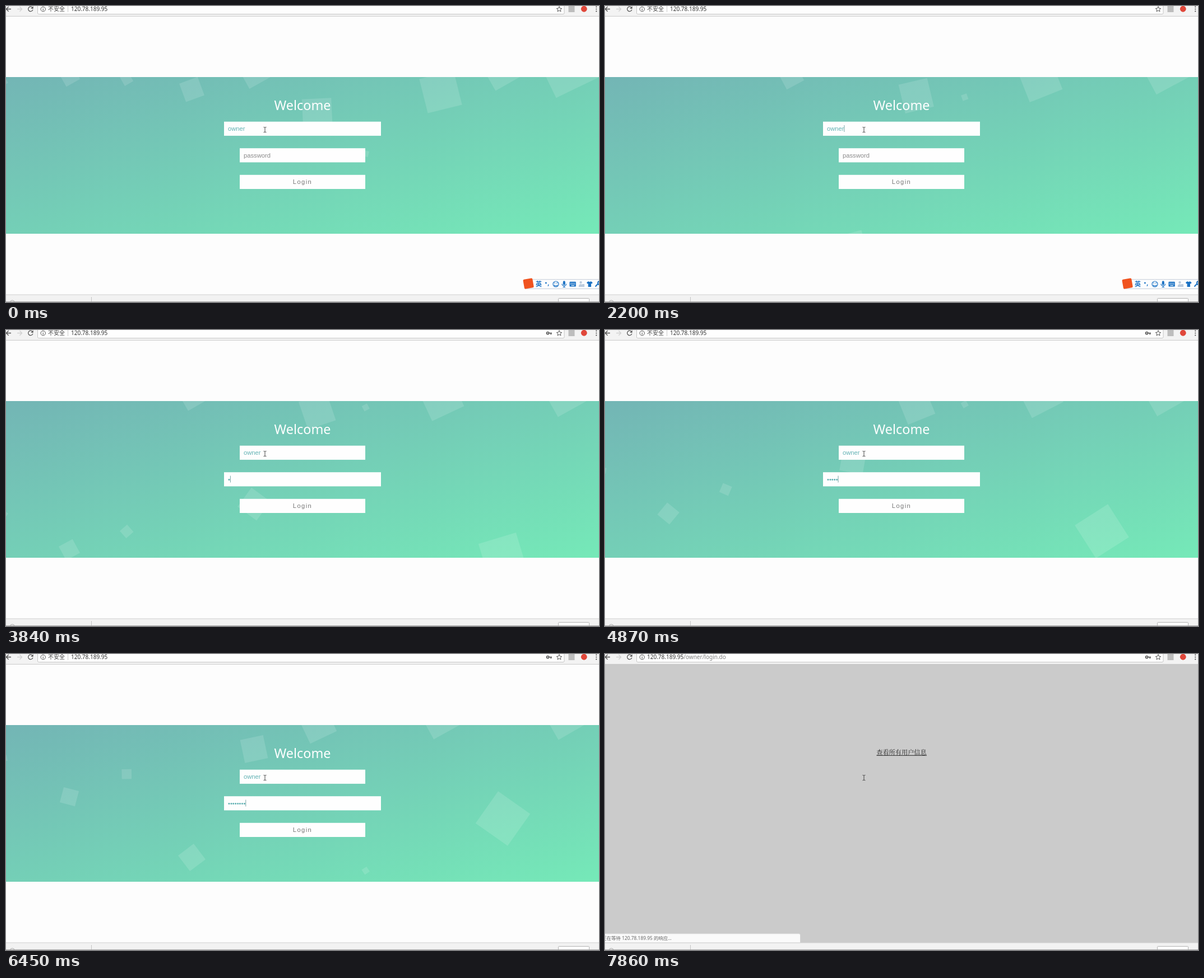
An HTML page for the animation above (8000 ms loop, 1058 px wide and 529 px high).

```html
<!DOCTYPE html>
<html lang="zh-CN">
<head>
<meta charset="utf-8">
<title>Login</title>
<style>
  html, body { margin: 0; width: 100%; height: 100%; overflow: hidden; background: #fdfdfd; }
  svg { display: block; width: 100%; height: 100%; }
  text { white-space: pre; }
  .ui { font-family: "Noto Sans", "Noto Sans CJK SC", sans-serif; font-size: 10px; fill: #333; }
  .field { font-family: "Liberation Sans", Arial, sans-serif; font-size: 11.2px; }
  .line { fill: none; stroke: #555; stroke-width: 1.3; }
  .blue { fill: #1b72c4; }
</style>
</head>
<body>
<svg viewBox="0 0 1058 529">
  <defs>
    <linearGradient id="sea" x1="0" y1="0" x2="1" y2="1">
      <stop offset="0" stop-color="#73b5b5"/>
      <stop offset="1" stop-color="#75e9b8"/>
    </linearGradient>
    <clipPath id="band"><rect y="127" width="1058" height="280"/></clipPath>
  </defs>

  <rect width="1058" height="529" fill="#fdfdfd"/>

  <g id="login">
    <rect x="-8.5" y="127" width="1075" height="280" fill="url(#sea)"/>
    <g id="bubbles" clip-path="url(#band)" fill="#fff" fill-opacity=".13"></g>
    <text x="529" y="186" text-anchor="middle" fill="#fff" class="ui" style="font-size:23.4px;fill:#fff">Welcome</text>
    <rect id="userBox" y="206.7" height="25.2" fill="#fefefe"/>
    <text id="userText" class="field" y="223"></text>
    <rect id="passBox" y="254.2" height="25.2" fill="#fefefe"/>
    <text id="passText" class="field" y="270.5"></text>
    <rect id="caret" width=".9" height="12" fill="#6a9c9c"/>
    <rect x="417" y="301.8" width="224" height="25.2" fill="#fefefe"/>
    <text class="field" x="511.8" y="318" letter-spacing="1.4" fill="#777">Login</text>
  </g>

  <g id="result">
    <rect y="18" width="1058" height="498" fill="#cbcbcb"/>
    <text x="529" y="180" text-anchor="middle" fill="#222" font-size="11.2" font-weight="300" font-family="'Noto Serif CJK SC', 'Noto Sans CJK SC', serif">查看所有用户信息</text>
    <path d="M484.5 181.2h89.5" stroke="#222" stroke-width="1.1"/>
  </g>

  <g id="chrome">
    <rect width="1058" height="18" fill="#f3f3f3"/>
    <path d="M0 18.3H1058" stroke="#c9c9c9"/>
    <path d="M56.5 -1V12.5Q56.5 14.5 58.5 14.5H994Q996 14.5 996 12.5V-1" fill="#fefefe" stroke="#c4c4c4"/>
    <path class="line" d="M9 5.5H0.8M4.6 1.2 0.5 5.5 4.6 9.8"/>
    <path class="line" d="M20 5.5H28.2M24.4 1.2 28.5 5.5 24.4 9.8" style="stroke:#d2d2d2"/>
    <g id="reload">
      <path class="line" d="M47 2.6A4.2 4.2 0 1 0 47.9 6.6"/>
      <path d="M48.6 .4V4.8H44.2Z" fill="#555"/>
    </g>
    <path id="stop" class="line" d="M39.8 1.6 47.6 9.6M47.6 1.6 39.8 9.6" style="stroke-width:1.5"/>
    <circle class="line" cx="66.2" cy="5.6" r="4.2" style="stroke-width:1"/>
    <path d="M66.2 5V8.2M66.2 2.9V4" stroke="#555" stroke-width="1.1"/>
    <g id="insecure">
      <text class="ui" x="75" y="9.3" style="fill:#444">不安全</text>
      <path d="M110.5 0V11" stroke="#ccc"/>
    </g>
    <text class="ui" id="url" y="9.2">120.78.189.95<tspan id="path" fill="#808080">/owner/login.do</tspan></text>
    <g id="key">
      <circle class="line" cx="966.6" cy="5.5" r="2" style="stroke-width:1.7"/>
      <path d="M968.6 5.5H974M972.3 5.5V8.2" stroke="#555" stroke-width="1.7"/>
    </g>
    <path class="line" d="M987 .8 988.4 4.1 991.7 4.4 989.2 6.6 990 9.9 987 8.1 984 9.9 984.8 6.6 982.3 4.4 985.6 4.1Z" style="stroke-width:1"/>
    <rect x="1003.5" y="0" width="11" height="11" fill="#bdbdbd"/>
    <circle cx="1031.3" cy="5.3" r="5.4" fill="#e0473a"/>
    <g fill="#555"><circle cx="1053.3" cy="1.6" r="1.1"/><circle cx="1053.3" cy="5.5" r="1.1"/><circle cx="1053.3" cy="9.4" r="1.1"/></g>
  </g>

  <g id="ime">
    <rect x="926" y="488.8" width="140" height="16.4" rx="2" fill="#fcfdfe" stroke="#c3cbd8"/>
    <rect x="923.6" y="487.6" width="17" height="17" rx="2" fill="#f0531f" transform="rotate(-10 932 496)"/>
    <text class="ui blue" x="945" y="501" style="font-size:11px;font-weight:700;fill:#1b72c4">英</text>
    <circle class="blue" cx="963.4" cy="495" r="1.4"/>
    <path d="M967.6 497.5Q968.5 499.2 966.8 500.6" stroke="#1b72c4" stroke-width="1.4" fill="none"/>
    <g fill="none" stroke="#1b72c4" stroke-width="1.2">
      <circle cx="981" cy="497" r="5"/>
      <path d="M978 498.5Q981 502 984 498.5M979.2 494.2V496M982.8 494.2V496"/>
      <path d="M992 496.5Q992 500 995.8 500T999.6 496.5M995.8 500V502.5M993.5 502.5H998"/>
    </g>
    <rect class="blue" x="993.8" y="491.3" width="4" height="7.4" rx="2"/>
    <rect class="blue" x="1005.5" y="492.8" width="11.3" height="8.6" rx="1"/>
    <path d="M1007 495.3H1015.5M1007 497.3H1015.5" stroke="#fff" stroke-dasharray="1.3 1"/>
    <path d="M1008.5 499.6H1014" stroke="#fff"/>
    <g fill="#bccbdd"><circle cx="1025.5" cy="494" r="2.2"/><path d="M1021.8 502Q1021.8 497 1025.5 497T1029 502Z"/><rect x="1028" y="497" width="4" height="5"/></g>
    <path class="blue" d="M1039 492 1036 494.3 1037.3 496.6 1038.6 496V502H1044V496L1045.3 496.6 1046.6 494.3 1043.6 492Q1041.3 494 1039 492Z"/>
    <path d="M1051.5 501.5 1056 496.5M1059 492A3 3 0 1 0 1059 498" fill="none" stroke="#1b72c4" stroke-width="2"/>
  </g>

  <rect y="516" width="1058" height="13" fill="#f2f2f2"/>
  <path d="M0 516H1058" stroke="#cfcfcf"/>
  <path d="M152.5 520V528" stroke="#c4c4c4"/>
  <path d="M7 529A4.5 4.5 0 0 1 15.5 529" fill="none" stroke="#aaa"/>
  <rect x="985.5" y="522.5" width="55" height="9" rx="1" fill="#fefefe" stroke="#b2b2b2"/>
  <path d="M0 528.5H1058" stroke="#a5a5a5"/>

  <g id="status">
    <path id="bubble" d="M-1 499.8H346Q348.5 499.8 348.5 502V516H-1Z" stroke="#d2d2d2"/>
    <text class="ui" x="-5.5" y="510.6" style="font-size:8.4px;fill:#666">正在等待 120.78.189.95 的响应...</text>
  </g>

  <path d="M459.6 216.5Q461.4 216.5 462 217.4 462.6 216.5 464.4 216.5M462 217.4V225M459.6 225.8Q461.4 225.8 462 225 462.6 225.8 464.4 225.8" fill="none" stroke="#444" stroke-width="1"/>
</svg>

<script>
const LOOP = 8000, FOCUS = 2500, SUBMIT = 7440, LOADED = 7860;
const USER = "owner";

const ticks = [0, 130, 285, 440, 595, 750, 905, 1060, 1220, 1370, 1500, 1640, 1780, 1920, 2060, 2200,
  2350, 2500, 2650, 2800, 2940, 3130, 3320, 3500, 3680, 3850, 4030, 4200, 4380, 4570, 4720, 4870,
  5050, 5210, 5380, 5550, 5710, 5860, 6010, 6160, 6310, 6450, 6610, 6760, 6930, 7100, 7270, 7440, 7620, 7860];

const erase = [440, 595, 750, 905, 1060];
const type = [1640, 1780, 1920, 2060, 2200];
const secret = [3680, 4030, 4200, 4380, 4720, 5380, 5860, 6160, 6930];
const edits = [-600, ...erase, ...type, FOCUS, ...secret];

// side, period in seconds, phase at the start
const squares = [
  [10.5, 9.75, .888], [28, 14.6, .922], [17.5, 11.7, .907], [35, 11.7, .655], [42, 9.75, .891],
  [52.5, 22.9, .472], [10.5, 7.79, .364], [63, 21.4, .574], [70, 19, .933], [84, 29.25, .765]
];
const FLOOR = 490, RISE = 352, TURN = -120;

const $ = id => document.getElementById(id);
const show = (id, on) => { $(id).style.display = on ? "" : "none"; };
const set = (el, attrs) => { for (const k in attrs) el.setAttribute(k, attrs[k]); };
const count = (times, t) => times.filter(x => x <= t).length;

// CSS "ease": cubic-bezier(.25, .1, .25, 1)
function ease(x) {
  if (x <= 0) return 0;
  if (x >= 1) return 1;
  let lo = 0, hi = 1, s;
  for (let i = 0; i < 24; i++) {
    s = (lo + hi) / 2;
    if (.75 * s * (1 - s) + s ** 3 < x) lo = s; else hi = s;
  }
  return .3 * s * (1 - s) ** 2 + 3 * s * s * (1 - s) + s ** 3;
}

const rects = squares.map(([side]) => {
  const r = document.createElementNS("http://www.w3.org/2000/svg", "rect");
  set(r, { x: -side / 2, y: -side / 2, width: side, height: side });
  return $("bubbles").appendChild(r);
});

function drawSquares(t) {
  squares.forEach(([side, period, phase], i) => {
    const e = ease((phase + t / 1000 / period) % 1);
    const x = i * 107.5 - 8.5 + side / 2;
    const y = FLOOR - side / 2 - RISE * e;
    rects[i].setAttribute("transform", `translate(${x} ${y}) rotate(${TURN * e})`);
  });
}

function drawField(name, grow, value, hint) {
  const width = 224 + 56 * grow, x = 529 - width / 2;
  set($(name + "Box"), { x, width });
  const text = $(name + "Text");
  text.textContent = value || hint;
  set(text, { x: x + 7, fill: value ? "#62b2b4" : "#8a8a8a" });
  return x + 7 + (value ? text.getComputedTextLength() : 0);
}

function draw(t) {
  const loaded = t >= LOADED, busy = t >= SUBMIT && !loaded, onPass = t >= FOCUS;
  drawSquares(t);

  show("login", !loaded);
  show("result", loaded);
  if (!loaded) {
    const grow = ease((t - FOCUS) / 250);
    const letters = USER.length - count(erase, t) + count(type, t);
    const userEnd = drawField("user", 1 - grow, USER.slice(0, letters), "user login");
    const passEnd = drawField("pass", grow, "•".repeat(count(secret, t)), "password");
    const last = edits[count(edits, t) - 1];
    show("caret", !busy && (t - last) % 1060 < 530);
    set($("caret"), { x: onPass ? passEnd : userEnd, y: onPass ? 260.5 : 213 });
  }

  show("ime", !onPass);
  show("key", t >= secret[0]);
  show("reload", !busy);
  show("stop", busy);
  show("insecure", !loaded);
  show("path", loaded);
  show("status", t >= SUBMIT);
  set($("url"), { x: loaded ? 75 : 116 });
  set($("bubble"), { fill: loaded ? "#fafafa" : "#f2f2f2" });
}

let shown = -1;
function frame() {
  const tick = ticks[count(ticks, performance.now() % LOOP) - 1];
  if (tick !== shown) draw(shown = tick);
  requestAnimationFrame(frame);
}
frame();
</script>
</body>
</html>
```
